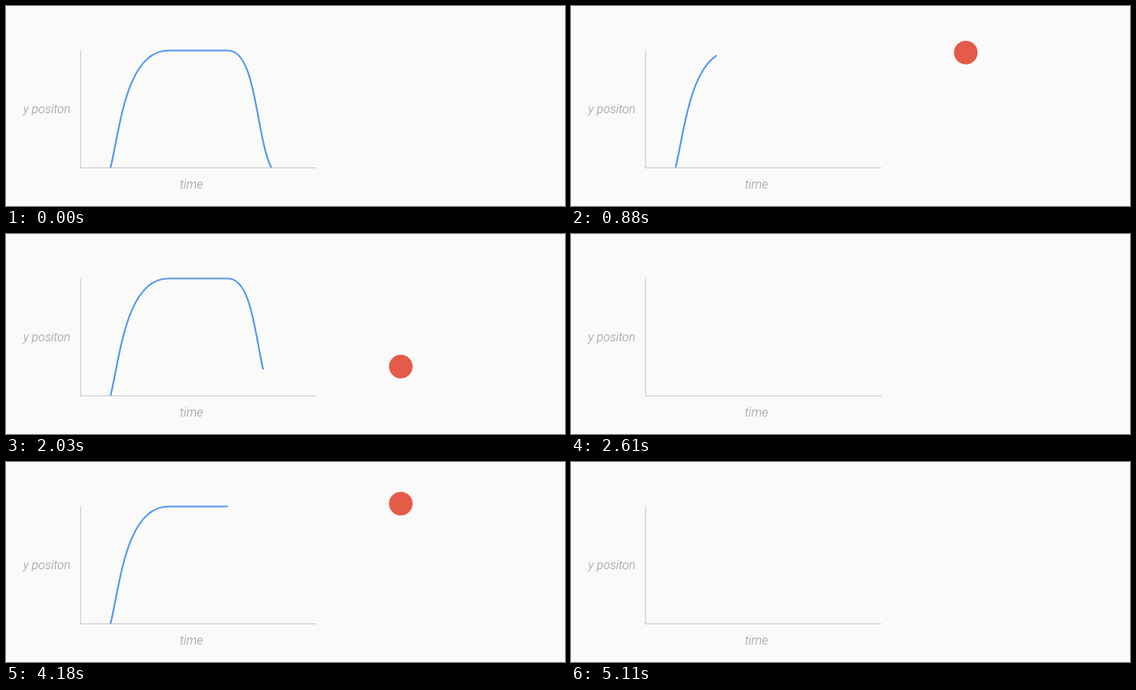
These frames come from a looping animation (733 by 263 pixels, 5.27 s). An HTML page:

```html
<!DOCTYPE html>
<html lang="en">
<head>
<meta charset="utf-8">
<title>Position over time</title>
<style>
  html, body { margin: 0; width: 100%; height: 100%; overflow: hidden; background: #fafafa; }
  svg { display: block; }
  text { font: italic 300 16px Roboto, sans-serif; fill: #979797; }
  path { fill: none; }
</style>
</head>
<body>
<svg width="733" height="263" viewBox="0 0 733 263">
  <clipPath id="above"><rect width="733" height="212.4"/></clipPath>
  <text x="22.6" y="141">y positon</text>
  <text x="228" y="240">time</text>
  <path d="M97.7 58.5V212.7H407" stroke="#d4d4d4" stroke-width="1.5"/>
  <g clip-path="url(#above)">
    <path id="curve" stroke="#5297ee" stroke-width="2.2"
      d="M131 233C133 230 135 221 137 213C149 165 157 58.5 213 58.5H291C329 58.5 327 170 348 213C352 221 358 233 366 233"/>
    <circle id="ball" cx="517.7" r="15.5" fill="#e55b49"/>
  </g>
</svg>
<script>
const LOOP = 5270;
const START_X = 131, END_X = 366;

// Each run: [time in ms, x of the curve's tip], then the time it is wiped
const runs = [
  { keys: [[410, 132], [880, 191], [1680, 291], [2030, 337], [2260, END_X]], wipe: 2610 },
  { keys: [[2900, 132], [3200, 171.5], [3950, 264], [4180, 291], [4500, 329], [4760, END_X]], wipe: 5110 }
];

const curve = document.getElementById('curve');
const ball = document.getElementById('ball');
const total = curve.getTotalLength();

function tipX(t) {
  if (t < 150) return END_X;
  const run = runs.find(r => t >= r.keys[0][0] && t < r.wipe);
  if (!run) return START_X;
  const i = run.keys.findIndex(k => k[0] > t);
  if (i < 0) return END_X;
  const [t0, x0] = run.keys[i - 1], [t1, x1] = run.keys[i];
  return x0 + (x1 - x0) * (t - t0) / (t1 - t0);
}

function lengthAt(x) {
  if (x <= START_X) return 0;
  if (x >= END_X) return total;
  let lo = 0, hi = total;
  for (let i = 0; i < 16; i++) {
    const mid = (lo + hi) / 2;
    if (curve.getPointAtLength(mid).x < x) lo = mid; else hi = mid;
  }
  return lo;
}

function draw(t) {
  const len = lengthAt(tipX(t));
  curve.style.strokeDasharray = `${len} ${total + 10}`;
  curve.style.visibility = len ? 'visible' : 'hidden';
  ball.setAttribute('cy', curve.getPointAtLength(len).y - 3.7);
}

const begin = performance.now();
function tick() {
  draw((performance.now() - begin) % LOOP);
  requestAnimationFrame(tick);
}
tick();
</script>
</body>
</html>
```
